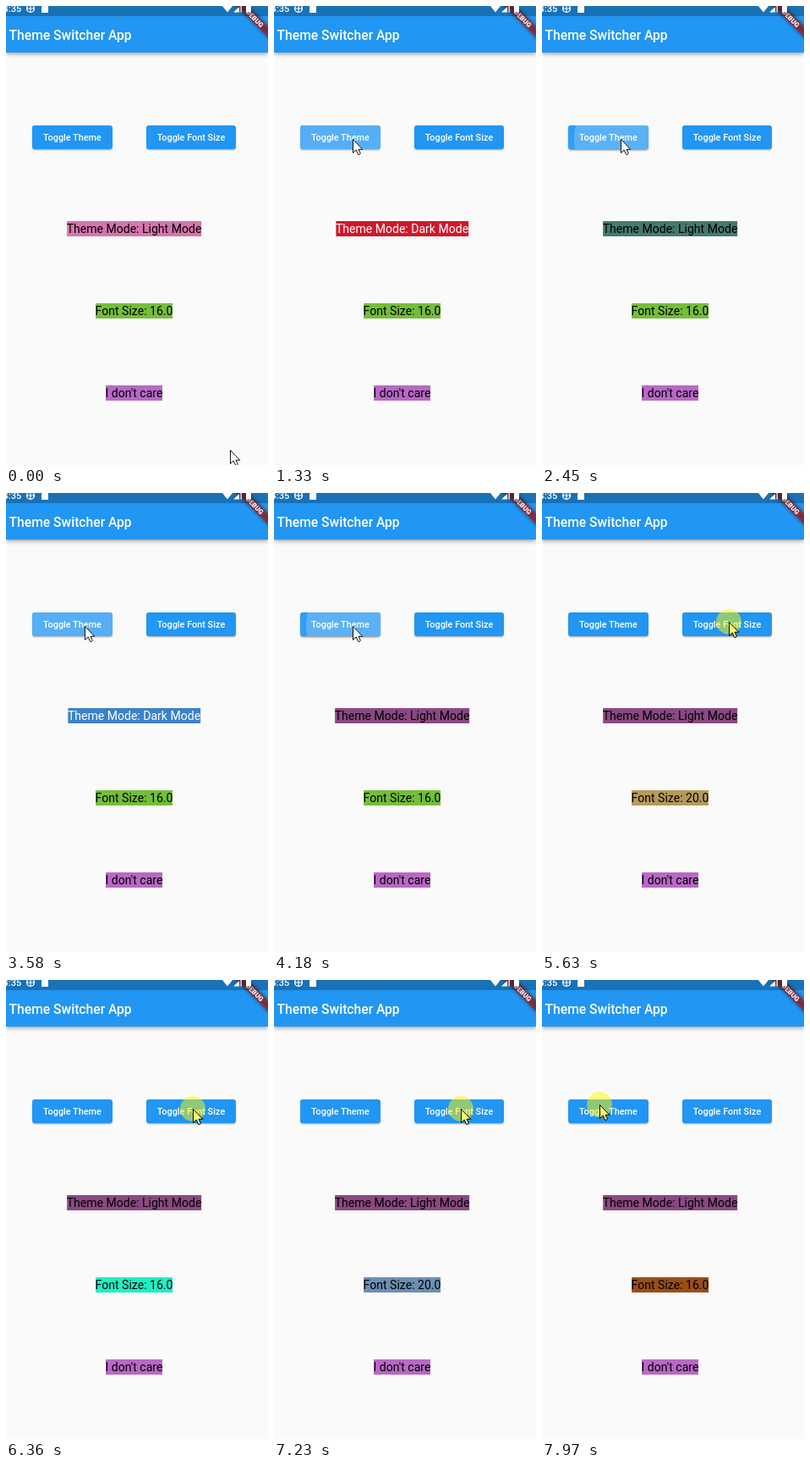
Recreate the animation shown at these times as an HTML page. Size 310 by 542 pixels, loop 8000 ms.

```html
<!DOCTYPE html>
<html lang="en">
<head>
<meta charset="utf-8">
<title>Theme Switcher App</title>
<style>
html, body { margin: 0; width: 100%; height: 100%; overflow: hidden; }
body { position: relative; background: #fafafa; font-family: Roboto, sans-serif; cursor: default; }
.bar, .status, .btn, .row, .row span, .tap, .cursor { position: absolute; }

.bar {
  left: 0; top: 0; width: 310px; height: 55px; background: #2196f3;
  box-shadow: 0 1.5px 3px -1px #0003, 0 3px 4px #0002, 0 1px 8px #0002;
}
h1 {
  position: absolute; left: 3.6px; top: 13px; margin: 0; line-height: 44px; white-space: nowrap;
  font-size: 15.65px; font-weight: 500; color: #fff;
}
.status { left: 0; top: 0; width: 310px; height: 60px; }

.btn {
  top: 141px; height: 28px; border-radius: 3px; background: #2196f3; color: #fff;
  display: flex; align-items: center; justify-content: center;
  font-size: 10.9px; font-weight: 500; white-space: nowrap;
  box-shadow: 0 2px 1px -1.5px #0003, 0 1.5px 1.5px #0002, 0 1px 3px #0000001c;
}
.btn b { position: relative; font-weight: 500; }
.mode { left: 31px; width: 95px; --x: 62px; --y: 16px; }
.size { left: 166px; width: 106px; --x: 55px; --y: 11px; }

/* one .tap per click, delayed to the moment the ripple starts */
.tap {
  inset: 0; border-radius: 3px; overflow: hidden; opacity: 0;
  animation: tap 8s linear var(--at) infinite;
}
.tap::before {
  content: ""; position: absolute; left: calc(var(--x) - 75px); top: calc(var(--y) - 75px);
  width: 150px; height: 150px; border-radius: 50%; background: #fff; opacity: 0;
  animation: splash 8s linear var(--at) infinite;
}
@keyframes tap {
  0% { opacity: 0; background: #fff0; box-shadow: 0 0 0 #0000, 0 0 0 #0000; }
  .75% {
    opacity: 1; background: #ffffff22;
    box-shadow: 0 3px 4px -1px #00000024, 0 4px 7px #0000001a;
  }
  1.625% {
    opacity: 1; background: #ffffff12;
    box-shadow: 0 2px 3px -1px #0000001a, 0 2px 4px #00000014;
  }
  2.625% { opacity: 1; background: #ffffff08; box-shadow: 0 0 0 #0000, 0 0 0 #0000; }
  6%, 100% { opacity: 0; background: #fff0; box-shadow: 0 0 0 #0000, 0 0 0 #0000; }
}
@keyframes splash {
  0% { opacity: .18; transform: scale(0); }
  .75% { opacity: .2; transform: scale(.28); }
  1.625% { opacity: .21; transform: scale(.73); }
  2.2% { opacity: .23; transform: scale(1); }
  2.625% { opacity: .22; transform: scale(1); }
  6%, 100% { opacity: 0; transform: scale(1); }
}

.row { left: 0; width: 303px; height: 17.5px; line-height: 19px; font-size: 14.05px; color: #000; }
.row span { left: 50%; width: max-content; height: 17.5px; transform: translateX(-50%); white-space: nowrap; }
.theme .a { animation: theme 8s step-end infinite, themeA 8s step-end infinite; }
.theme .b { animation: theme 8s step-end infinite, themeB 8s step-end infinite; }
.font .a { animation: font 8s step-end infinite, fontA 8s step-end infinite; }
.font .b { animation: font 8s step-end infinite, fontB 8s step-end infinite; }
@keyframes theme {
  0% { background: #d774ae; color: #000; }
  15.25% { background: #d0182b; color: #fff; }
  30.25% { background: #457a6d; color: #000; }
  43.375% { background: #3b82cb; color: #fff; }
  51.875%, 100% { background: #8a4983; color: #000; }
}
@keyframes themeA {
  0%, 30.25% { opacity: 1; }
  15.25%, 43.375% { opacity: 0; }
  51.875%, 100% { opacity: 1; }
}
@keyframes themeB {
  0%, 30.25% { opacity: 0; }
  15.25%, 43.375% { opacity: 1; }
  51.875%, 100% { opacity: 0; }
}
@keyframes font {
  0% { background: #74be38; }
  61% { background: #b59a5c; }
  72.375% { background: #1cf0c5; }
  83.125% { background: #6c8fb4; }
  93.125%, 100% { background: #9a4e14; }
}
@keyframes fontA {
  0%, 72.375% { opacity: 1; }
  61%, 83.125% { opacity: 0; }
  93.125%, 100% { opacity: 1; }
}
@keyframes fontB {
  0%, 72.375% { opacity: 0; }
  61%, 83.125% { opacity: 1; }
  93.125%, 100% { opacity: 0; }
}

.cursor { left: 0; top: 0; width: 12px; height: 19px; overflow: visible; animation: move 8s ease-in-out infinite; }
.cursor path { stroke: #111; stroke-width: 1; }
.press { animation: press 8s step-end infinite; }
@keyframes move {
  0%, .5% { transform: translate(265px, 524px); }
  5.75%, 9.95% { transform: translate(93px, 158px); }
  10%, 54% { transform: translate(93px, 157px); }
  57.75%, 93.75% { transform: translate(221px, 152px); }
  97.875%, 100% { transform: translate(68px, 147px); }
}
@keyframes press {
  0%, 14.1%, 29.1%, 42%, 50.6%, 59.75%, 71.2%, 81.75%, 92% { opacity: 0; }
  12.375%, 27.375%, 39%, 48.875%, 58%, 69.625%, 79.5%, 90.375%, 99.6%, 100% { opacity: 1; }
}
</style>
</head>
<body>
<div class="bar"><h1>Theme Switcher App</h1></div>

<svg class="status" viewBox="0 0 310 60" font-family="Roboto, sans-serif">
  <g transform="translate(313 -4) rotate(45) scale(.78)">
    <rect x="-40" y="28" width="80" height="12" opacity=".5" style="filter: blur(3px)"/>
    <rect x="-40" y="28" width="80" height="12" fill="#b71c1c" fill-opacity=".63"/>
    <text y="37.6" fill="#fff" font-size="10.2" font-weight="900" text-anchor="middle">DEBUG</text>
  </g>
  <!-- the system bar lies over the app, banner included -->
  <rect width="310" height="12" fill-opacity=".25"/>
  <g fill="#fff">
    <text x="-3.5" y="7.3" font-size="11" font-weight="500">4:35</text>
    <path d="M29-1.5V7.5M24.5 3H33.5" stroke="#fff" stroke-width="1.2"/>
    <circle cx="29" cy="3" r="4.4" fill="none" stroke="#fff" stroke-width="1.4"/>
    <path d="M42 8V1l3-3h5V8Z"/>
    <path d="M256 0Q262-4 268 0L262 7.5Z"/>
    <path d="M276 1V7.5H269Z M277.5-1h1.3V7.5h-1.3Z"/>
    <rect x="284" y="-2" width="6" height="9.5" rx=".8"/>
  </g>
</svg>

<div class="btn mode">
  <i class="tap" style="--at: 1120ms"></i>
  <i class="tap" style="--at: 2320ms"></i>
  <i class="tap" style="--at: 3370ms"></i>
  <i class="tap" style="--at: 4050ms"></i>
  <b>Toggle Theme</b>
</div>
<div class="btn size">
  <i class="tap" style="--at: 4780ms"></i>
  <i class="tap" style="--at: 5690ms"></i>
  <i class="tap" style="--at: 6550ms"></i>
  <i class="tap" style="--at: 7350ms"></i>
  <b>Toggle Font Size</b>
</div>

<div class="row theme" style="top: 254px"><span class="a">Theme Mode: Light Mode</span><span class="b">Theme Mode: Dark Mode</span></div>
<div class="row font" style="top: 351px"><span class="a">Font Size: 16.0</span><span class="b">Font Size: 20.0</span></div>
<div class="row" style="top: 448px"><span style="background: #b868c5">I don't care</span></div>

<svg class="cursor" viewBox="0 0 12 19">
  <defs><path id="arrow" d="M.5.5V16.5L4.2 13 6.6 18.3 8.2 18.5 9.3 17 7 12.3H11.7Z"/></defs>
  <use href="#arrow" fill="#fff"/>
  <g class="press">
    <circle r="15" fill="#fffa00" fill-opacity=".5"/>
    <use href="#arrow" fill="#fdf573"/>
  </g>
</svg>
</body>
</html>
```
